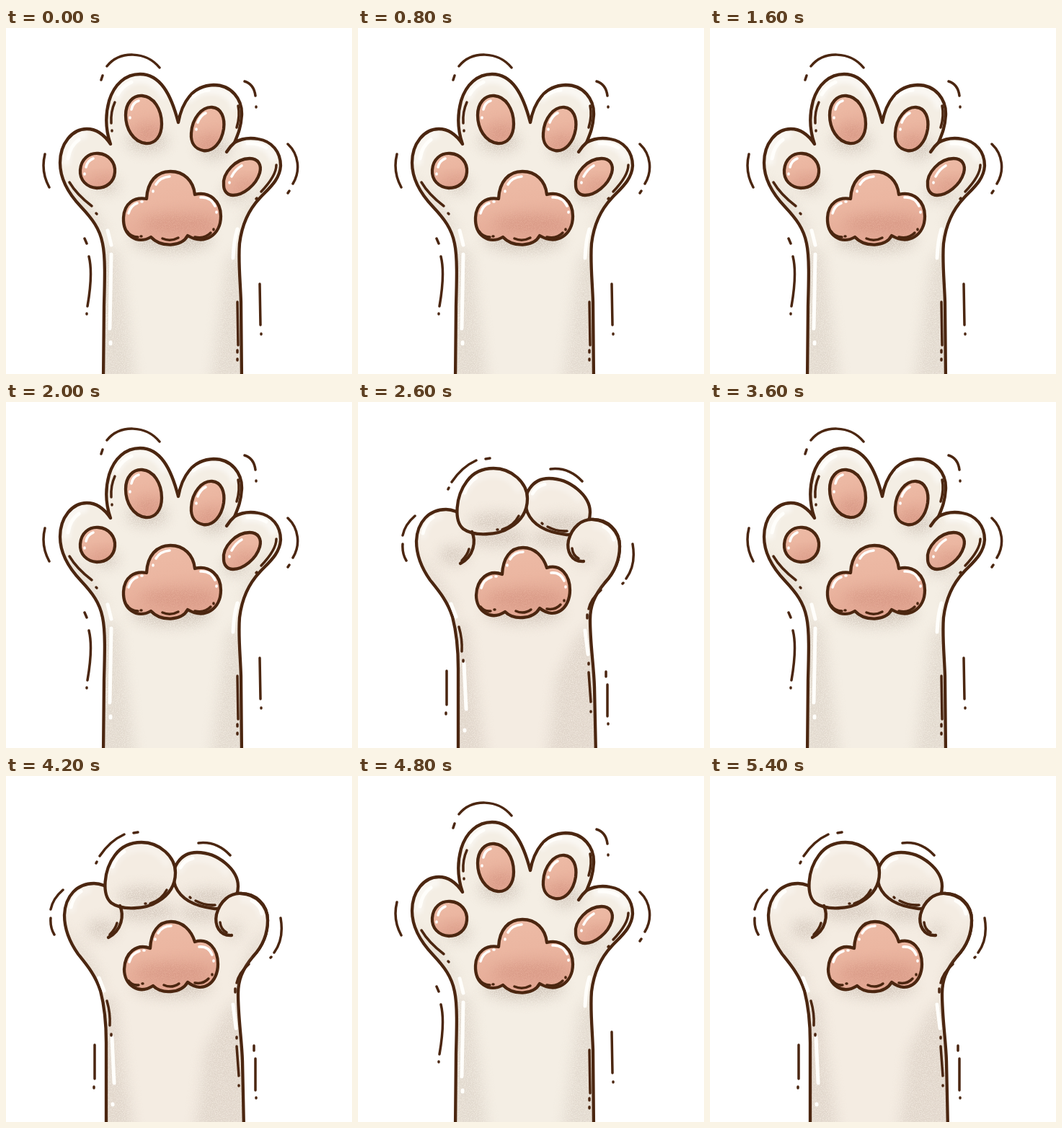
An HTML page that plays this animation: 480x480 px, repeating every 5600 ms.

```html
<!DOCTYPE html>
<html lang="en">
<head>
<meta charset="utf-8">
<title>Cat paw</title>
<style>
  html, body { margin: 0; width: 100%; height: 100%; overflow: hidden; background: #fff; }
  svg { display: block; width: 100vw; height: 100vh; }
  .ink, .mark, .dab { fill: none; stroke-linecap: round; stroke-linejoin: round; }
  .ink { stroke: #4b2610; stroke-width: 4.3; }
  .mark { stroke: #4b2610; stroke-width: 3.5; }
  .dab { stroke: #fffefb; stroke-width: 5; }
  .thin { stroke-width: 3.6; }
  .pad { fill: url(#pink); }
  .shade { fill: #a8978a; filter: url(#grain); }
  .blush { fill: #c98573; filter: url(#grain); opacity: .5; }
  .glow { fill: none; stroke: #fff; stroke-width: 12; filter: url(#blur); opacity: .55; }
  .fist .glow { opacity: .3; }
  .pose { animation: flip 400ms step-end infinite; }
  .open { animation-name: show; }
  .fist { animation-name: hide; }
  @keyframes show { 0% { visibility: visible } 50%, 100% { visibility: hidden } }
  @keyframes hide { 0% { visibility: hidden } 50%, 100% { visibility: visible } }
</style>
</head>
<body>
<svg viewBox="0 0 480 480">
  <defs>
    <linearGradient id="pink" x1="0" y1="0" x2=".25" y2="1">
      <stop offset="0" stop-color="#eebca7"/>
      <stop offset=".5" stop-color="#ebb6a1"/>
      <stop offset="1" stop-color="#e5aa96"/>
    </linearGradient>
    <filter id="blur" x="-30%" y="-30%" width="160%" height="160%"><feGaussianBlur stdDeviation="3"/></filter>
    <filter id="grain" x="-80%" y="-80%" width="260%" height="260%" color-interpolation-filters="sRGB">
      <feGaussianBlur in="SourceGraphic" stdDeviation="9" result="soft"/>
      <feTurbulence type="fractalNoise" baseFrequency=".75" numOctaves="2" seed="4"/>
      <feColorMatrix values="0 0 0 0 0  0 0 0 0 0  0 0 0 0 0  0 0 0 2 -.25" result="specks"/>
      <feComposite in="soft" in2="specks" operator="in"/>
    </filter>

    <path id="hand" d="M135 490 L136 385 C137 350 138 318 134 299 C130 278 119 264 104 248
      C86 229 75 208 75 187 C75 160 92 140 112 140 C126 140 137 149 145 161
      C138 141 138 119 143 101 C150 78 166 64 186 64 C214 64 229 92 239 131
      C244 104 258 80 288 79 C313 79 328 99 327 121 C326 138 322 147 317 159
      C327 153 339 152 350 154 C369 157 381 172 381 191 C380 211 364 223 352 236
      C336 253 327 274 324 299 C322 324 325 350 326 380 L327 490"/>
    <path id="palm" d="M195 237 C196 213 209 199 228 199 C247 199 260 212 262 231
      C282 226 298 240 298 261 C298 287 276 302 252 288 C244 304 215 305 201 290
      C182 301 162 288 163 263 C164 243 178 234 195 237Z"/>
    <path id="tip2" d="M166 121 C166 104 176 93 189 94 C205 95 216 113 216 133
      C216 150 207 161 194 160 C176 158 166 139 166 121Z"/>
    <path id="tip3" d="M257 146 C258 125 272 109 286 110 C299 111 304 125 302 140
      C299 159 287 172 274 170 C262 168 256 159 257 146Z"/>
    <path id="tip1" d="M103 197 C104 182 115 173 128 174 C143 175 152 187 151 200
      C150 214 139 222 126 222 C112 221 102 211 103 197Z"/>
    <path id="tip4" d="M302 218 C300 201 319 181 338 181 C350 181 355 190 352 201
      C347 218 329 232 315 232 C307 232 302 226 302 218Z"/>

    <path id="arm" d="M139 490 L139 370 C139 340 136 317 131 298 C124 276 112 262 100 247
      C88 230 81 211 81 193 C82 166 99 149 122 149 C131 149 139 152 148 160
      L200 150 L270 150 L322 163 C346 161 363 178 363 200 C363 222 355 237 343 250
      C327 269 322 284 322 302 C322 335 327 365 328 395 L330 490"/>
    <path id="curl2" d="M146 176 C133 165 135 131 151 110 C161 96 174 92 188 92
      C213 92 235 112 235 134 C235 151 226 165 211 174 C194 185 161 187 146 176Z"/>
    <path id="curl3" d="M235 153 C226 128 242 106 265 106 C294 106 322 130 322 153
      C322 173 307 185 289 184 C263 181 243 172 235 153Z"/>
    <path id="curl4" d="M313 221 C296 222 289 207 292 192 C297 173 311 162 326 163
      C347 164 363 180 363 200 C363 222 355 237 343 250"/>
    <path id="heel" d="M200 239 C201 217 211 202 229 202 C245 202 257 214 262 230
      C281 224 294 240 294 261 C294 286 274 303 252 286 C243 302 216 303 204 291
      C184 304 164 290 164 268 C165 245 181 232 200 239Z"/>

    <clipPath id="inHand"><use href="#hand"/></clipPath>
    <clipPath id="inArm"><use href="#arm"/></clipPath>
    <clipPath id="inPalm"><use href="#palm"/></clipPath>
    <clipPath id="inHeel"><use href="#heel"/></clipPath>
    <clipPath id="inTip1"><use href="#tip1"/></clipPath>
    <clipPath id="inTip2"><use href="#tip2"/></clipPath>
    <clipPath id="inTip3"><use href="#tip3"/></clipPath>
    <clipPath id="inTip4"><use href="#tip4"/></clipPath>
    <clipPath id="inCurl2"><use href="#curl2"/></clipPath>
    <clipPath id="inCurl3"><use href="#curl3"/></clipPath>
  </defs>

  <g class="pose open">
    <use href="#hand" fill="#f4eee4"/>
    <g clip-path="url(#inHand)">
      <g opacity=".45">
        <ellipse class="shade" cx="196" cy="157" rx="28" ry="15"/>
        <ellipse class="shade" cx="288" cy="167" rx="22" ry="15"/>
        <ellipse class="shade" cx="139" cy="218" rx="17" ry="11"/>
        <ellipse class="shade" cx="318" cy="228" rx="17" ry="12"/>
        <ellipse class="shade" cx="230" cy="293" rx="56" ry="18"/>
      </g>
      <g opacity=".25">
        <path class="shade" d="M126 300 L156 310 L168 400 L180 495 L126 495Z"/>
        <path class="shade" d="M336 300 L308 320 L296 400 L284 495 L336 495Z"/>
        <path class="shade" d="M70 205 L110 235 L142 285 L120 285Z"/>
        <path class="shade" d="M385 200 L350 225 L325 275 L340 275Z"/>
      </g>
      <path class="glow" d="M83 190 Q84 148 113 147 M151 99 Q163 70 188 71 Q211 73 222 97
        M251 101 Q264 85 288 86 Q314 88 319 112 M327 161 Q365 156 373 184"/>
    </g>

    <g class="pad">
      <use href="#tip1"/><use href="#tip2"/><use href="#tip3"/><use href="#tip4"/><use href="#palm"/>
    </g>
    <g clip-path="url(#inTip1)"><ellipse class="blush" cx="135" cy="216" rx="18" ry="8"/></g>
    <g clip-path="url(#inTip2)"><ellipse class="blush" cx="197" cy="146" rx="20" ry="13"/></g>
    <g clip-path="url(#inTip3)"><ellipse class="blush" cx="282" cy="160" rx="20" ry="11"/></g>
    <g clip-path="url(#inTip4)"><ellipse class="blush" cx="333" cy="219" rx="18" ry="8"/></g>
    <g clip-path="url(#inPalm)"><ellipse class="blush" cx="240" cy="272" rx="54" ry="14"/></g>
    <g class="ink">
      <use href="#tip1"/><use href="#tip2"/><use href="#tip3"/><use href="#tip4"/>
      <use href="#palm"/><use href="#hand"/>
      <path d="M317 159 Q311 164 306 172"/>
    </g>

    <path class="dab" d="M86 181 Q89 163 101 155 M155 92 Q162 80 174 75 M260 95 Q269 87 281 86
      M335 160 Q350 159 361 166 M141 281 L146 301 M146 314 L144 417 M145 436 L145 438
      M321 279 Q316 295 315 319"/>
    <path class="dab thin" d="M174 113 Q176 103 184 101 M266 131 Q270 121 277 118
      M111 193 Q113 184 121 181 M313 206 Q318 196 327 191 M208 217 Q214 207 227 206
      M270 235 Q284 234 290 247 M170 257 Q173 246 182 243 M172 124 v1 M264 140 v1
      M109 202 v1 M310 214 v1 M204 226 v1 M292 255 v1 M188 241 h1"/>
    <path class="mark" d="M151 103 Q145 116 146 132 M147 142 v1 M322 108 Q325 122 320 138
      M88 214 Q98 231 119 247 M125 257 l1 1 M375 190 Q375 205 354 227 M348 236 l-1 1
      M321 380 L322 440 M321 447 v3 M321 459 v2
      M168 282 Q173 290 183 290 M187 289 h1 M217 292 Q228 297 239 291 M262 290 Q276 293 284 284 M288 279 v1"/>
    <path class="mark" d="M140 53 C158 31 194 32 213 55 M134 66 L132 72 M331 74 Q344 78 346 94 M347 109 v1
      M54 175 Q48 199 60 221 M391 161 C406 175 409 198 398 216 M393 226 l-2 3
      M109 292 L112 299 M115 317 C120 337 117 363 113 386 M112 396 v1 M352 355 L353 412 M354 424 v1"/>
  </g>

  <g class="pose fist">
    <use href="#arm" fill="#f4ece2"/>
    <g clip-path="url(#inArm)">
      <g opacity=".42">
        <ellipse class="shade" cx="133" cy="213" rx="20" ry="13"/>
        <ellipse class="shade" cx="195" cy="188" rx="42" ry="12"/>
        <ellipse class="shade" cx="272" cy="190" rx="32" ry="11"/>
        <ellipse class="shade" cx="230" cy="291" rx="55" ry="17"/>
      </g>
      <g opacity=".27">
        <path class="shade" d="M128 300 L152 310 L164 400 L178 495 L128 495Z"/>
        <path class="shade" d="M338 300 L304 325 L276 380 L262 495 L338 495Z"/>
        <path class="shade" d="M76 205 L110 240 L138 290 L118 290Z"/>
      </g>
      <path class="glow" d="M90 190 Q92 158 118 157"/>
    </g>
    <use href="#arm" class="ink"/>

    <use href="#curl3" fill="#f4ece2"/>
    <g clip-path="url(#inCurl3)">
      <g opacity=".42"><ellipse class="shade" cx="283" cy="170" rx="40" ry="13"/></g>
      <path class="glow" d="M239 135 Q245 114 267 114 Q295 116 309 137"/>
    </g>
    <use href="#curl3" class="ink"/>

    <use href="#curl2" fill="#f4ece2"/>
    <g clip-path="url(#inCurl2)">
      <g opacity=".42"><ellipse class="shade" cx="194" cy="167" rx="40" ry="13"/></g>
      <path class="glow" d="M144 135 Q154 101 187 99 Q215 101 225 125"/>
    </g>
    <use href="#curl2" class="ink"/>
    <path class="ink" d="M158 180 C164 193 161 214 142 224"/>

    <use href="#curl4" fill="#f4ece2"/>
    <g clip-path="url(#inArm)">
      <g opacity=".3">
        <ellipse class="shade" cx="315" cy="215" rx="13" ry="12"/>
        <path class="shade" d="M366 210 L344 230 L322 290 L336 290Z"/>
      </g>
      <path class="glow" d="M325 170 Q353 172 356 197"/>
    </g>
    <use href="#curl4" class="ink"/>

    <use href="#heel" class="pad"/>
    <g clip-path="url(#inHeel)"><ellipse class="blush" cx="232" cy="273" rx="54" ry="14"/></g>
    <use href="#heel" class="ink"/>

    <path class="dab" d="M90 182 Q93 167 104 160 M148 126 Q153 112 164 105 M242 127 Q247 117 259 114
      M341 173 Q353 179 355 191 M129 280 L136 298 M147 362 L150 426 M148 455 v1 M315 317 L319 350"/>
    <path class="dab thin" d="M211 218 Q217 208 229 208 M268 237 Q281 236 286 248
      M171 258 Q174 246 185 243 M207 226 v1 M288 256 v1 M191 242 h1"/>
    <path class="mark" d="M200 177 Q216 172 223 158 M193 177 h1 M263 173 Q276 180 290 179 M255 168 l1 1
      M154 204 Q152 212 144 220 M297 203 Q298 213 306 217 M337 261 Q323 273 320 287 M318 295 v5
      M140 312 Q145 329 144 346 M146 358 v2 M320 362 v2 M320 375 L323 416 M323 429 v1
      M170 284 Q175 291 184 290 M189 288 h1 M219 290 Q230 295 240 288 M262 287 Q274 289 281 281 M286 275 v1"/>
    <path class="mark" d="M130 111 Q144 90 164 81 M126 119 l-1 2 M177 79 L183 78
      M267 93 Q292 90 311 110 M79 158 Q65 170 62 185 M62 197 Q61 210 67 220
      M381 197 Q386 226 372 245 M368 251 l-1 1 M123 373 L123 420 M122 431 v2
      M344 374 L344 381 M346 392 L346 436 M347 446 v1"/>
  </g>
</svg>
</body>
</html>
```
